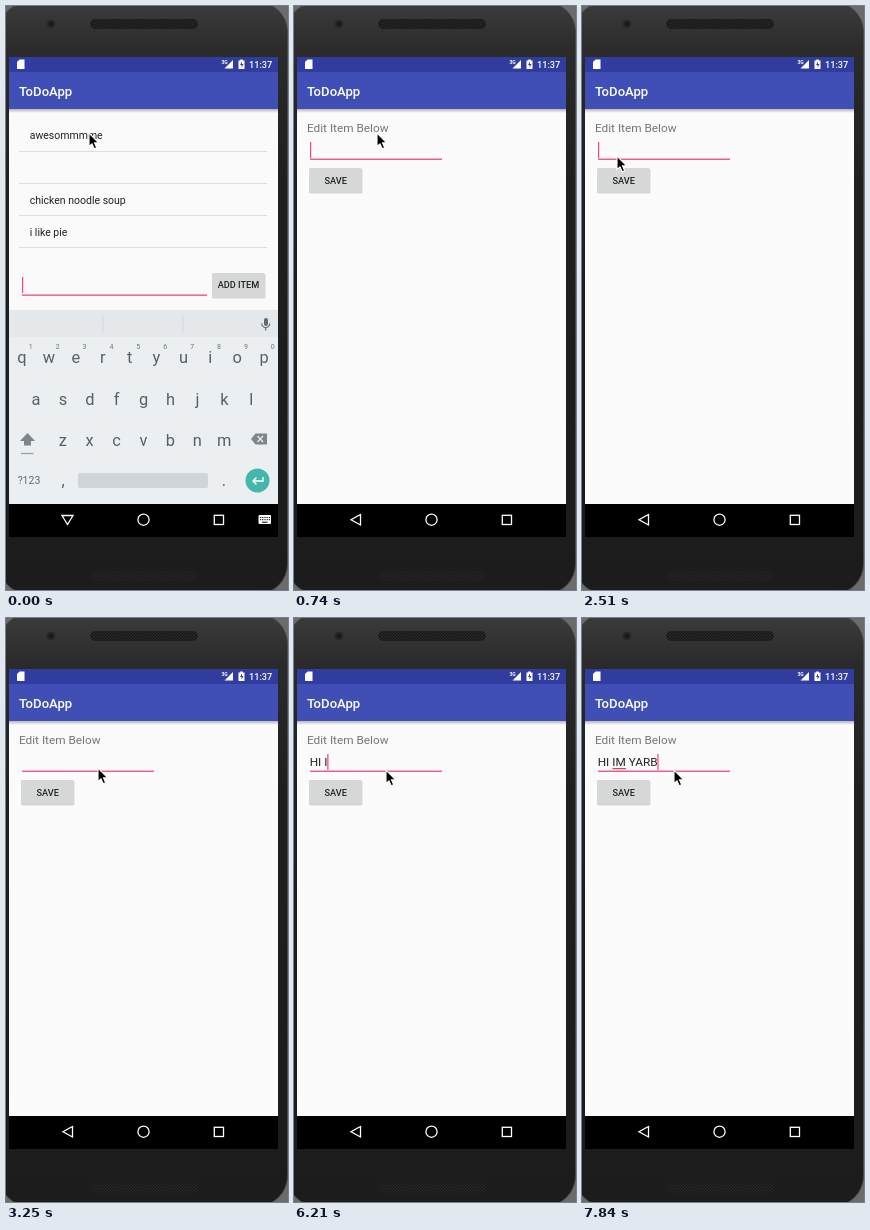
An HTML page for the animation above (7990 ms loop, 282x584 px).

```html
<!DOCTYPE html>
<html lang="en">
<head>
<meta charset="utf-8">
<title>ToDoApp</title>
<style>
  html, body { margin: 0; width: 100%; height: 100%; overflow: hidden; background: #6b6b6b; }
  svg { display: block; }
  text { font-family: Roboto, sans-serif; white-space: pre; }
  .item { font-size: 10.5px; fill: #222; }
  .big { font-size: 11.8px; }
  .caps { font-size: 9.17px; font-weight: 500; fill: #222; text-anchor: middle; }
  .key { font-size: 16.4px; fill: #566065; text-anchor: middle; }
  .digit { font-size: 7px; fill: #6f787c; text-anchor: middle; }
  .pink { fill: #f5438a; }
  .line { fill: none; stroke: #fff; stroke-width: 1.3; }
</style>
</head>
<body>
<svg width="282" height="584" viewBox="0 0 282 584">
  <defs>
    <linearGradient id="body" x2="0" y2="1">
      <stop offset="0" stop-color="#3c3c3c"/>
      <stop offset=".08" stop-color="#2b2b2b"/>
      <stop offset=".3" stop-color="#1f1f1f"/>
      <stop offset="1" stop-color="#1c1c1c"/>
    </linearGradient>
    <linearGradient id="shade" x2="0" y2="1">
      <stop offset="0" stop-opacity=".28"/>
      <stop offset="1" stop-opacity="0"/>
    </linearGradient>
    <pattern id="mesh" width="3" height="3" patternUnits="userSpaceOnUse">
      <rect width="3" height="3" fill="#151515"/>
      <path d="M0 0h1.5v1.5h-1.5zM1.5 1.5h1.5v1.5h-1.5z" fill="#292929"/>
    </pattern>
    <clipPath id="screen"><rect x="3" y="51" width="269" height="447"/></clipPath>
    <g id="bars">
      <rect x="3" y="51" width="269" height="16" fill="#303d9f"/>
      <rect x="3" y="66" width="269" height="37" fill="#3f4fb6"/>
      <rect x="3" y="103" width="269" height="4" fill="url(#shade)"/>
      <text x="13" y="89.5" font-size="13.1" font-weight="500" fill="#fff">ToDoApp</text>
    </g>
  </defs>

  <rect x="-7" y="-4" width="288.500" height="592" rx="30" fill="url(#body)" stroke="#484848"/>
  <circle cx="45" cy="18" r="4.500" fill="#242424" stroke="#333"/>
  <circle cx="45" cy="18" r="2" fill="#191919"/>
  <rect x="84" y="13" width="108" height="10" rx="5" fill="url(#mesh)"/>
  <rect x="85" y="565" width="107" height="10" rx="5" fill="url(#mesh)"/>
  <rect x="3" y="51" width="269" height="480"/>

  <g clip-path="url(#screen)">
    <g id="list">
      <rect x="3" y="51" width="269" height="447" fill="#fafafa"/>
      <use href="#bars"/>
      <g id="rows"></g>
      <rect class="pink" x="16" y="288.500" width="185" height="1.300"/>
      <rect class="pink" id="listCaret" x="16" y="271" width="1.200" height="16"/>
      <rect x="206" y="268" width="53.500" height="24.500" rx="1.500" opacity=".15"/>
      <rect x="206" y="267" width="53" height="24" rx="1.500" fill="#d6d7d7"/>
      <text class="caps" x="232.500" y="282.300">ADD ITEM</text>
    </g>
    <g id="edit">
      <rect x="3" y="51" width="269" height="447" fill="#fafbfa"/>
      <use href="#bars"/>
      <text class="big" x="13" y="126" fill="#757575">Edit Item Below</text>
      <text class="big" id="input" x="15.700" y="148" fill="#222"></text>
      <rect id="typo" x="30.500" y="150" width="13.500" height="1.200" fill="#d8404f"/>
      <rect class="pink" x="16" y="152.600" width="132" height="1.300"/>
      <rect class="pink" id="editCaret" y="136" width="1.200" height="16"/>
      <rect x="15" y="163" width="53.500" height="24.500" rx="1.500" opacity=".15"/>
      <rect x="15" y="162" width="53" height="24" rx="1.500" fill="#d6d7d7"/>
      <text class="caps" x="41.700" y="177.700">SAVE</text>
    </g>
    <g id="keyboard">
      <rect x="3" y="304" width="269" height="200" fill="#eceff1"/>
      <rect x="3" y="304" width="269" height="27" fill="#e4e8eb"/>
      <path d="M97 309v18M177 309v18" stroke="#d2d7da"/>
      <rect x="258" y="312" width="4" height="8" rx="2" fill="#626b70"/>
      <path d="M255.700 317.500a4 4 0 0 0 8 0M259.700 321.500v3" fill="none" stroke="#626b70" stroke-width="1.200"/>
      <g id="keys"></g>
      <path d="M21.500 427l-7.500 8h4v4.500h7v-4.500h4z" fill="#7d868a"/>
      <path d="M15 447.500h12.500" stroke="#9aa2a6" stroke-width="1.300"/>
      <path d="M245 433l4.500-5.500h11.500v11h-11.500z" fill="#7d868a"/>
      <path d="M251.500 430l5.500 6m0-6l-5.500 6" stroke="#eceff1" stroke-width="1.300"/>
      <text x="23" y="478" font-size="10.500" text-anchor="middle" fill="#626b70">?123</text>
      <rect x="72" y="467" width="130" height="15" rx="2" fill="#cfd5d9"/>
      <circle cx="251.500" cy="474.500" r="12" fill="#45b6aa"/>
      <path d="M257 471v4h-10m3.500-3.500l-3.500 3.500l3.500 3.500" fill="none" stroke="#fff" stroke-width="1.400"/>
    </g>
  </g>

  <path d="M11 56l2.500-2.500h5v9.500h-7.500z" fill="#fff"/>
  <text x="215.500" y="58" font-size="5" font-weight="700" fill="#fff">3G</text>
  <path d="M218.500 62.500h8.500v-8.500z" fill="#fff"/>
  <path d="M232.500 54.500h1.700v-1h2.600v1h1.700v8.500h-6z" fill="#fff"/>
  <path d="M236 55.500l-2 3.500h1.500v2.500l2-3.500h-1.500z" fill="#303d9f"/>
  <text x="243" y="62" font-size="9.170" font-weight="500" fill="#fff">11:37</text>

  <path class="line" id="down" d="M56 509.500h11l-5.500 9z"/>
  <path class="line" id="back" d="M66.500 508.500v10.500l-9.500-5.250z"/>
  <circle class="line" cx="137.500" cy="513.700" r="5.600"/>
  <rect class="line" x="208.300" y="509.300" width="9.200" height="9.200"/>
  <g id="imeIcon">
    <rect x="252.500" y="509" width="12.500" height="9" rx="1" fill="#fff"/>
    <path d="M254 511.500h10M254 513.700h10" stroke="#000" stroke-dasharray="1.200 1"/>
    <path d="M256 516.200h5.500" stroke="#000"/>
  </g>
  <path id="cursor" d="M0 0v13.500l3-2.700l2.200 5l2.500-1.100l-2.200-4.800h4.200z" stroke="#fff" stroke-width="1.100"/>
</svg>
<script>
const LOOP = 7990;
const el = id => document.getElementById(id);
const show = (id, on) => el(id).setAttribute('visibility', on ? 'inherit' : 'hidden');
const label = (cls, x, y, s) => `<text class="${cls}" x="${x}" y="${y}">${s}</text>`;

el('rows').innerHTML = ['awesommmme', '', 'chicken noodle soup', 'i like pie'].map((s, i) =>
  label('item', 23.7, 133.3 + i * 32.1, s) +
  `<rect x="13" y="${145 + i * 32}" width="248" height="1" fill="#dedede"/>`).join('');

const keyRow = (letters, x, y) => [...letters].map((c, i) => label('key', x + i * 26.9, y, c)).join('');
el('keys').innerHTML =
  keyRow('qwertyuiop', 16, 357) + keyRow('asdfghjkl', 30, 398.5) + keyRow('zxcvbnm', 56.7, 439.5) +
  label('key', 57, 480, ',') + label('key', 218, 480, '.') +
  [...'1234567890'].map((c, i) => label('digit', 24.7 + i * 26.9, 342.5, c)).join('');

// [time, x, y] of the pointer tip
const pointer = [
  [0, 83, 127], [1040, 81, 133], [1190, 74, 148], [1330, 65, 162], [1480, 60, 170],
  [1770, 58, 178], [1920, 50, 188], [2070, 42, 192], [2210, 38, 194], [2360, 34, 174],
  [2510, 35, 150], [2650, 78, 137], [2800, 146, 126], [2950, 183, 132], [3100, 148, 143],
  [3250, 92, 150], [3540, 92, 152]
];
const typing = [
  [0, ''], [4880, 'H'], [5030, 'HI'], [5170, 'HI '], [6210, 'HI I'], [6960, 'HI IM'], [7100, 'HI IM '],
  [7400, 'HI IM Y'], [7550, 'HI IM YA'], [7690, 'HI IM YAR'], [7840, 'HI IM YARB']
];
const blinks = [150, 590, 1040, 1620, 2070, 2510, 3100, 3540, 3990, 4430, 5770, 6210, 6810, 6960];
// [time, opacity, offset] of the edit screen as it opens
const opening = [[0, 0, 38], [440, .5, 20], [590, .975, 3], [740, 1, 0]];

const at = (steps, t) => steps.filter(s => s[0] <= t).pop();

function draw(t) {
  const [, opacity, offset] = at(opening, t);
  el('edit').setAttribute('opacity', opacity);
  el('edit').setAttribute('transform', `translate(0 ${offset})`);
  const opened = t >= 590;
  show('keyboard', t < 740);
  el('keyboard').setAttribute('transform', `translate(0 ${opened ? 1 : 0})`);
  show('down', !opened);
  show('back', opened);
  show('imeIcon', !opened);

  const [, x, y] = at(pointer, t);
  el('cursor').setAttribute('transform', `translate(${x} ${y})`);

  const text = at(typing, t)[1];
  const input = el('input');
  input.textContent = text;
  el('editCaret').setAttribute('x', text ? 15.5 + input.getComputedTextLength() : 16);
  show('typo', text.length > 5);
  const caretOn = blinks.filter(b => b <= t).length % 2 === 0;
  show('listCaret', caretOn && !opened);
  show('editCaret', caretOn);
}

function tick() {
  draw(performance.now() % LOOP);
  requestAnimationFrame(tick);
}
tick();
</script>
</body>
</html>
```
